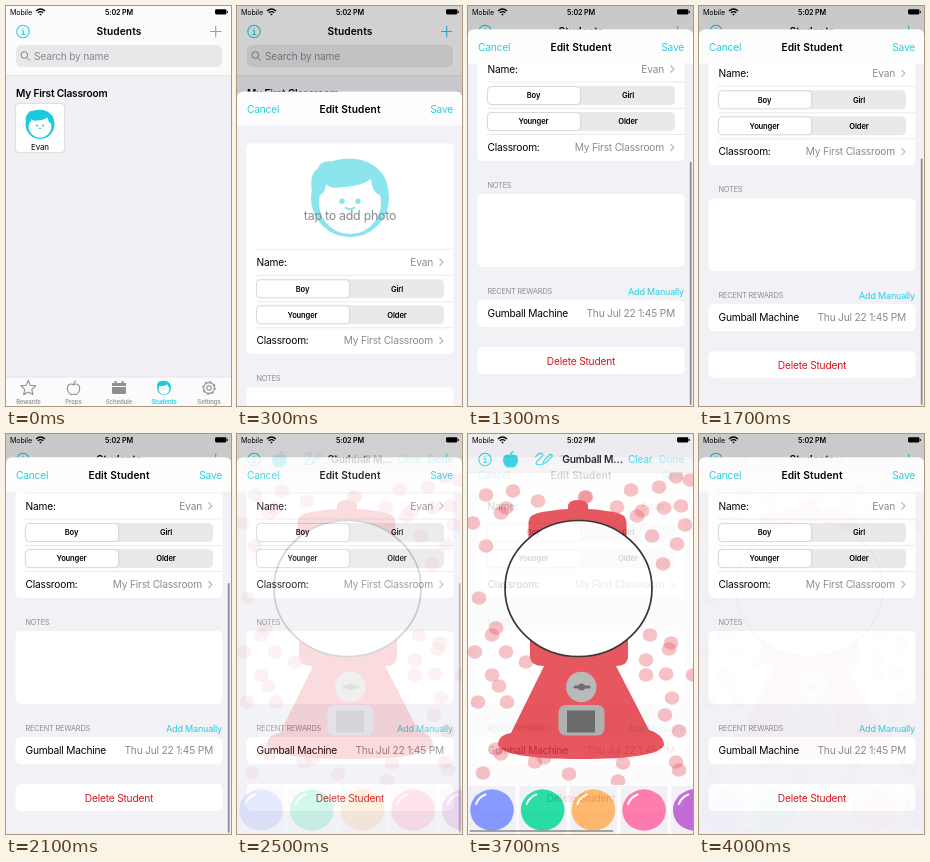
Write an HTML page that moves like this. It is 225 px wide and 400 px high and loops after 4100 ms.

```html
<!DOCTYPE html>
<html lang="en">
<head>
<meta charset="utf-8">
<title>Classroom app</title>
<style>
  html, body { margin: 0; width: 100%; height: 100%; overflow: hidden; background: #fff; }
  svg { display: block; width: 225px; height: 400px; }
  text { font: 10.2px Inter, sans-serif; letter-spacing: -.02em; }
  .b { font-weight: 600; }
  .title { font-weight: 600; text-anchor: middle; letter-spacing: .01em; }
  .m { text-anchor: middle; }
  .e { text-anchor: end; }
  .c { fill: #25cfe2; }
  .g { fill: #8a8a8f; }
  .s { font-size: 7.3px; }
  .status { font-size: 7.2px; }
  .seg { font-size: 7.6px; font-weight: 600; text-anchor: middle; }
  .tab { font-size: 6.1px; font-weight: 600; text-anchor: middle; fill: #999; }
  .line { fill: none; stroke: #25cfe2; stroke-width: 1.1; stroke-linecap: round; stroke-linejoin: round; }
  .tabs .line { stroke: #8e8e93; }
  .sep { stroke: #dedee2; stroke-width: .6; }
  .card { fill: #fff; }
  .lift { filter: drop-shadow(0 .6px 1px #0003); }
</style>
</head>
<body>
<svg viewBox="0 0 225 400">
  <defs>
    <g id="face" fill="#1bcadd">
      <circle r="39"/>
      <path d="M-38-8Q-41-24-32-30Q-30-38-18-37Q0-43 18-36Q38-26 38-6z"/>
      <path fill="#fff" d="M-30-3Q-25-5-24-14Q-18-9-10-11Q8-11 21-19Q22-6 30-3A31 31 0 1 1-30-3"/>
      <circle cx="-8" cy="3" r="2.7"/><circle cx="8" cy="3" r="2.7"/>
      <path d="M-5 9q5 4 10 0" fill="none" stroke="#1bcadd" stroke-width="2"/>
    </g>
    <g id="info" class="line">
      <circle r="6.2"/><path d="M-1-.8H.3V3M-1.4 3H1.8M0-3.2v.2"/>
    </g>
    <path id="apple" d="M0-3.2C-3-5-6.3-3.4-6.2.6C-6 4-3.5 7-1.8 6.6Q0 6 1.8 6.6C3.5 7 6 4 6.2.6C6.3-3.4 3-5 0-3.2Q0-6 2.3-7"/>
    <path id="chevron" d="M0-3.5L3.4 0L0 3.5" fill="none" stroke="#b8b8bd" stroke-width="1.2"/>
    <clipPath id="below"><path d="M0 57H225V400H0z"/></clipPath>
  </defs>

  <g id="home">
    <path d="M0 0H225V400H0z" fill="#f0f0f5"/>
    <path d="M0 0H225V69H0zM0 371H225V400H0z" fill="#fbfbfb"/>
    <path class="sep" d="M0 69.3H225M0 371H225"/>
    <use href="#info" x="17" y="25.5"/>
    <text class="title" x="113" y="29">Students</text>
    <path class="line" d="M204.5 25.5h10.4M209.7 20.3v10.4"/>
    <rect x="10" y="39" width="206" height="22" rx="6" fill="#e8e8ea"/>
    <g fill="none" stroke="#85858a"><circle cx="18.3" cy="49" r="3.3"/><path d="M20.7 51.5l3 3"/></g>
    <text class="g" x="28" y="53.7">Search by name</text>
    <text class="b" x="10" y="91">My First Classroom</text>
    <rect class="card lift" x="10" y="98" width="48" height="48" rx="3.5"/>
    <use href="#face" transform="translate(34 118.5) scale(.37)"/>
    <text class="m" x="34" y="143.5" style="font-size:8px">Evan</text>
    <g class="tabs">
      <path class="line" d="M22.3 374.5l2.2 4.8 5.2.6-3.9 3.5 1.1 5.2-4.6-2.6-4.6 2.6 1.1-5.2-3.9-3.5 5.2-.6z"/>
      <use href="#apple" class="line" x="67.5" y="382"/>
      <path d="M106 377h14v3h-14zM108.5 375h2v3h-2zM115.5 375h2v3h-2zM106 381h14v6q0 1-1 1h-12q-1 0-1-1z" fill="#8e8e93"/>
      <g class="line" transform="translate(203 382)">
        <circle r="5.4"/><circle r="2.2"/><circle r="6.2" stroke-dasharray="1.6 3.27"/>
      </g>
    </g>
    <use href="#face" transform="translate(158 382) scale(.18)"/>
    <text class="tab" x="22.5" y="397.7">Rewards</text>
    <text class="tab" x="67.5" y="397.7">Props</text>
    <text class="tab" x="113" y="397.7">Schedule</text>
    <text class="tab" x="158" y="397.7" style="fill:#25cfe2">Students</text>
    <text class="tab" x="203" y="397.7">Settings</text>
  </g>
  <path id="dim" d="M0 0H225V400H0z"/>

  <g id="sheet">
    <rect y="23.5" width="225" height="390" rx="6" fill="#f1f1f6"/>
    <g clip-path="url(#below)"><g id="content">
      <rect class="card" x="9.5" y="75" width="207" height="211" rx="5"/>
      <use href="#face" x="113" y="130" opacity=".5"/>
      <text class="g m" x="113" y="152" style="font-size:12.4px">tap to add photo</text>
      <path class="sep" d="M19 181H216M19 207H216M19 233.5H216M19 259.5H216"/>
      <text x="19.5" y="197.7">Name:</text>
      <text class="g e" x="196" y="197.7">Evan</text>
      <use href="#chevron" x="202.5" y="194"/>
      <g id="segments"></g>
      <text x="19.5" y="276">Classroom:</text>
      <text class="g e" x="196" y="276">My First Classroom</text>
      <use href="#chevron" x="202.5" y="272.5"/>
      <text class="g s" x="19.5" y="313">NOTES</text>
      <rect class="card" x="9.5" y="319" width="207" height="73" rx="5"/>
      <text class="g s" x="19.5" y="419">RECENT REWARDS</text>
      <text class="c e" x="216" y="419.5" style="font-size:9px">Add Manually</text>
      <rect class="card" x="9.5" y="425" width="207" height="27" rx="5"/>
      <text x="19.5" y="441.8">Gumball Machine</text>
      <text class="g e" x="207" y="441.8">Thu Jul 22 1:45 PM</text>
      <rect class="card" x="9.5" y="472" width="207" height="27" rx="5"/>
      <text class="m" x="113" y="489.8" fill="#d5141d">Delete Student</text>
    </g></g>
    <path d="M0 57.5V29.5q0-6 6-6H219q6 0 6 6v28z" fill="#fdfdfd"/>
    <text class="c" x="10" y="44.8">Cancel</text>
    <text class="title" x="113" y="44.8">Edit Student</text>
    <text class="c e" x="216" y="44.8">Save</text>
    <rect id="bar" x="221.8" width="1.8" rx=".9" fill="#8c8c90"/>
  </g>

  <g id="gum">
    <path d="M0 0H225V400H0z" fill="#fff"/>
    <g id="dots" fill="#e2363f" fill-opacity=".36"></g>
    <path d="M0 0H225V38H0z" fill="#f4f4f8"/>
    <path class="sep" d="M0 38.3H225"/>
    <g fill="#e2363f">
      <path d="M100 77V71Q102 66 110 66T120 71V77z"/>
      <path d="M60.5 110V88Q61 80 74 78Q92 74.500 110 74.500T146 78Q158 80 158.500 88V110z"/>
      <path d="M62 200H160V222Q160 232 148 232L181 296Q196 301 196 311Q190 325 113 325T30 311Q30 301 43 299L76 232Q62 232 62 222z"/>
    </g>
    <ellipse cx="110.5" cy="154.5" rx="73.5" ry="68" fill="#fff" stroke="#111" stroke-width="1.7"/>
    <circle cx="113.3" cy="253" r="15.2" fill="#adadad"/>
    <path d="M107 253h14" stroke="#505050" stroke-width="3" stroke-linecap="round"/>
    <circle cx="113.5" cy="253" r="3.5" fill="#505050"/>
    <rect x="90.5" y="271" width="46" height="30.5" rx="7" fill="#a3a3a3"/>
    <rect x="99" y="276.5" width="28" height="22" fill="#505050"/>
    <path d="M0 351H225V400H0z" fill="#fff"/>
    <g id="strip"></g>
    <rect id="slider" y="396" width="144" height="2" rx="1" fill="#777" fill-opacity=".75"/>
    <use href="#info" x="17" y="25.5"/>
    <use href="#apple" class="line" transform="translate(42.5 25.5) scale(1.12)" style="fill:#1bcadd"/>
    <path class="line" d="M67.5 23q4-5 6.500-3.500t-3 6-1 5 5-.5M75 30l1-3.500 6.500-6.500 2 2-6.500 6.500z"/>
    <text class="b m" x="124.5" y="29">Gumball M…</text>
    <text class="c" x="160" y="29">Clear</text>
    <text id="done" class="c b e" x="216" y="29">Done</text>
  </g>

  <g id="status">
    <text class="status" x="4" y="8.7">Mobile</text>
    <g fill="none" stroke="#000" stroke-width="1.3">
      <path d="M30 5q4.500-4 9 0M31.800 6.800q2.700-2.300 5.400 0M33.700 8.500h1.600"/>
    </g>
    <text class="status b m" x="113" y="8.7">5:02 PM</text>
    <rect x="209" y="3.3" width="11.5" height="5.2" rx="1.4"/><path d="M221.2 4.900h.8v2h-.8z"/>
  </g>
</svg>
<script>
const $ = id => document.getElementById(id);
const clamp = v => Math.max(0, Math.min(1, v));
const smooth = v => (v = clamp(v)) * v * (3 - 2 * v);
const move = (id, x, y) => $(id).setAttribute('transform', `translate(${x} ${y})`);
const fade = (id, v) => $(id).setAttribute('opacity', v);

// Linear interpolation through [time, value] pairs.
function track(points, t) {
  const i = points.findIndex(p => p[0] > t);
  if (i === 0) return points[0][1];
  if (i < 0) return points[points.length - 1][1];
  const [t0, a] = points[i - 1], [t1, b] = points[i];
  return a + (b - a) * (t - t0) / (t1 - t0);
}

const segment = (y, left, right) => `
  <rect x="19" y="${y}" width="188" height="19" rx="4.5" fill="#e9e9eb"/>
  <rect class="card lift" x="20" y="${y + 1}" width="92" height="17" rx="4"/>
  <text class="seg" x="65.5" y="${y + 12.3}">${left}</text>
  <text class="seg" x="160" y="${y + 12.3}">${right}</text>`;
$('segments').innerHTML = segment(211, 'Boy', 'Girl') + segment(237, 'Younger', 'Older');

const dots = `18,61 45,57 70,67 38,74 33,79 5,89 18,112 11,164 28,194 24,201 7,218 38,218
  58,228 24,241 31,252 10,268 39,268 15,339 33,320 28,315 67,328 76,324 101,340 150,347
  155,329 117,63 118,63 149,73 163,56 174,77 169,82 191,53 196,74 213,72 208,43 222,46
  184,102 195,130 209,110 217,91 203,209 201,215 182,201 178,226 178,241 198,240 225,241
  204,264 197,281 211,297 208,328 211,336`;
$('dots').innerHTML = dots.split(/\s+/).map(p => {
  const [x, y] = p.split(',');
  return `<ellipse cx="${x}" cy="${y}" rx="7.4" ry="6.8"/>`;
}).join('');

const colors = ['#6e87ff', '#00d994', '#ffab52', '#ff629f', '#b951d1', '#ff5a50', '#ffd83d'];
$('strip').innerHTML = colors.map((color, i) => `<g transform="translate(${24 + i * 50.7} 376)">
  <path d="M-23.5-24h47v48h-47z" fill="#f0f0f5"/><ellipse rx="21.8" ry="20.7" fill="${color}"/>
  <path d="M-16-6Q-13.5-13-6.5-15.5" fill="none" stroke="#fff" stroke-width="2" stroke-linecap="round"/></g>`).join('');

const scrollKeys = [[550, 0], [600, 8], [700, 34], [800, 66], [900, 92], [1000, 111], [1100, 123],
  [1200, 129], [1300, 131], [1600, 128], [1900, 124], [2100, 122]];
const stripKeys = [[2850, 0], [3000, 8], [3100, 34], [3200, 56], [3300, 40], [3400, 14], [3500, 2], [3600, 0]];

function draw(now) {
  const t = Math.floor(now % 4100 / 100) * 100;

  const s = Math.max(0, t - 50) * .013;
  const rise = t < 600 ? 1 - (1 + s) * Math.exp(-s) : 1;
  move('sheet', 0, 378 * (1 - rise));
  fade('dim', .2 * rise);

  const scroll = track(scrollKeys, t);
  move('content', 0, -scroll);
  const top = 58.5 + scroll * .742;
  $('bar').setAttribute('y', top);
  $('bar').setAttribute('height', Math.min(250, 399 - top));
  fade('bar', clamp((t - 500) / 150) * clamp((2700 - t) / 300));

  fade('gum', smooth((t - 2380) / 460) * (1 - smooth((t - 3580) / 460)));
  const slide = track(stripKeys, t);
  move('strip', -slide, 0);
  $('slider').setAttribute('x', 1.5 + slide * .64);
  fade('slider', clamp((t - 2800) / 150));
  fade('done', t < 3500 ? 1 : .3);
}

function loop() {
  draw(performance.now());
  requestAnimationFrame(loop);
}
loop();
</script>
</body>
</html>
```
